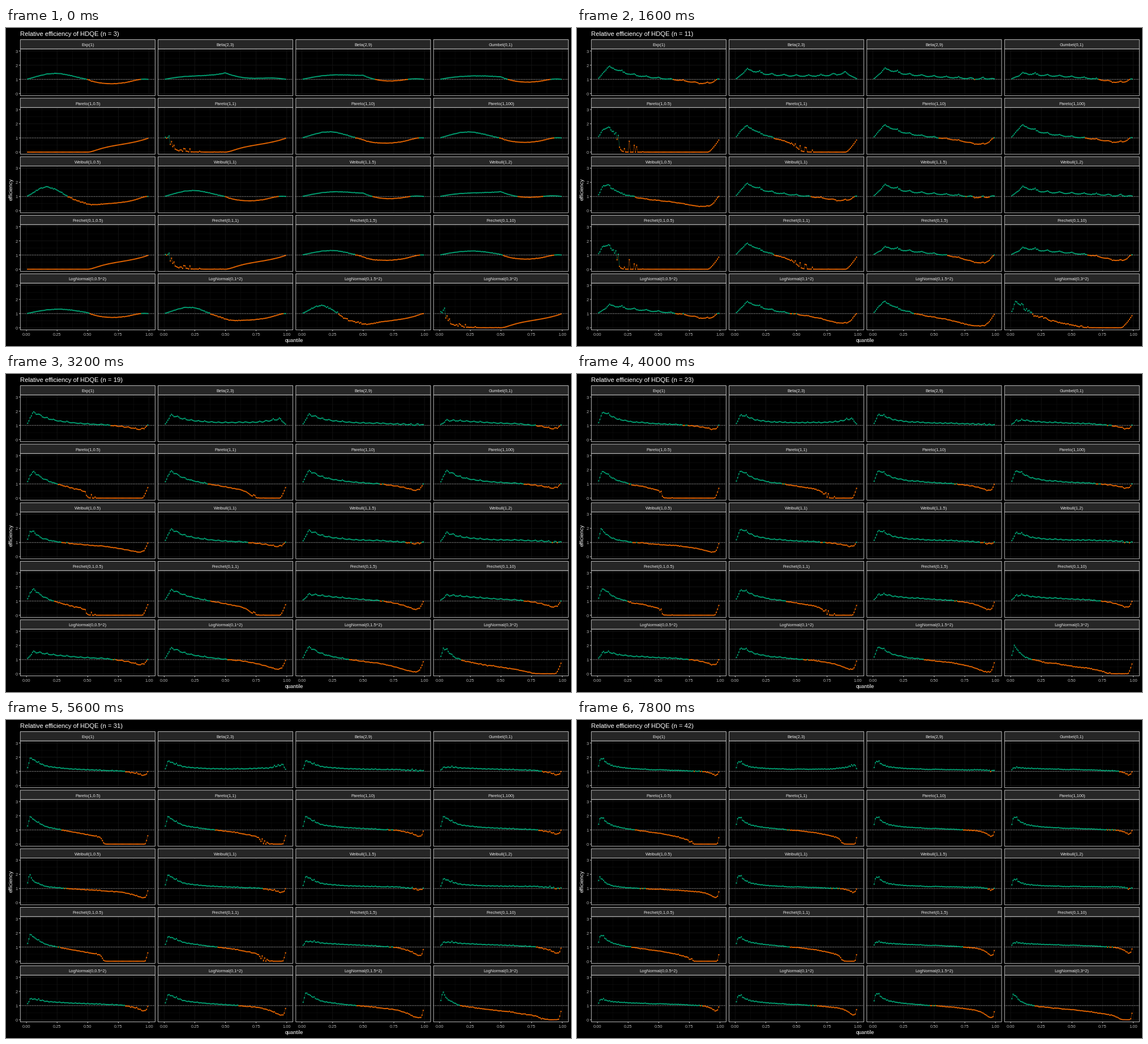
These frames come from a looping animation (998 by 561 pixels, 8000 ms). A matplotlib script:

```python
import math

import matplotlib.pyplot as plt
import numpy as np
from matplotlib.animation import FuncAnimation
from matplotlib.collections import LineCollection
from matplotlib.patches import Rectangle

W, H, DPI = 998, 561, 64
PT = 72 / DPI  # points per pixel
NAMES = [
    "Exp(1)", "Beta(2,3)", "Beta(2,9)", "Gumbel(0,1)",
    "Pareto(1,0.5)", "Pareto(1,1)", "Pareto(1,10)", "Pareto(1,100)",
    "Weibull(1,0.5)", "Weibull(1,1)", "Weibull(1,1.5)", "Weibull(1,2)",
    "Frechet(0,1,0.5)", "Frechet(0,1,1)", "Frechet(0,1,5)", "Frechet(0,1,10)",
    "LogNormal(0,0.5^2)", "LogNormal(0,1^2)", "LogNormal(0,1.5^2)", "LogNormal(0,3^2)",
]
SIZES = range(3, 43)
P = np.arange(1, 100) / 100
BLOCKS, BLOCK, USED = 24, 400, 13  # sample pool, and blocks drawn from it per quantile

GREEN, ORANGE = "#00A878", "#F06A00"
GRID, EDGE, STRIP = "#141414", "#CCCCCC", "#262626"

lgamma = np.vectorize(math.lgamma)
erfc = np.vectorize(math.erfc)


def betainc(a, b, x):
    """Regularised incomplete beta function by continued fraction."""
    a, b, x = np.broadcast_arrays(a, b, x)
    flip = x > (a + 1) / (a + b + 2)
    a, b, x = np.where(flip, b, a), np.where(flip, a, b), np.where(flip, 1 - x, x)
    c, d = np.ones_like(x), 1 / (1 - (a + b) * x / (a + 1))
    h = d
    for m in range(1, 50):
        e = a + 2 * m
        for k in (m * (b - m) * x / ((e - 1) * e),
                  -(a + m) * (a + b + m) * x / (e * (e + 1))):
            d = 1 / (1 + k * d)
            c = 1 + k / c
            h = h * c * d
    log_beta = lgamma(a) + lgamma(b) - lgamma(a + b)
    y = h * np.exp(a * np.log(x) + b * np.log1p(-x) - log_beta) / a
    return np.where(flip, 1 - y, y)


def tail_score(u, v):
    """log(-log(1-u)) - log(-log(u)) for lower and upper tail areas u, v."""
    lo = np.where(u < 0.5, -np.log1p(-np.minimum(u, 0.5)), -np.log(v))
    hi = np.where(v < 0.5, -np.log1p(-np.minimum(v, 0.5)), -np.log(u))
    return np.log(lo) - np.log(hi)


def beta_table(a, b):
    s = np.linspace(-12, 12, 2500)
    x, y = 1 / (1 + np.exp(-s)), 1 / (1 + np.exp(s))
    return tail_score(betainc(a, b, x), betainc(b, a, y)), x


def normal_table():
    z = np.linspace(-6, 6, 2500)
    return tail_score(erfc(-z / 2**0.5) / 2, erfc(z / 2**0.5) / 2), z


BETA3, BETA9, NORMAL = beta_table(2.0, 3.0), beta_table(2.0, 9.0), normal_table()


def transform(e):
    """Map standard exponentials to every distribution, in panel order."""
    log_g = np.log(-np.log(-np.expm1(-e)))
    score = np.log(e) - log_g
    par, fre = np.exp(e), np.exp(-log_g)
    root = np.exp(np.interp(score, *NORMAL) / 2)
    cube = root * root * root
    return [
        e, np.interp(score, *BETA3), np.interp(score, *BETA9), -log_g,
        par * par, par, np.exp(e / 10), np.exp(e / 100),
        e * e, e, np.cbrt(e * e), np.sqrt(e),
        fre * fre, fre, np.exp(-log_g / 5), np.exp(-log_g / 10),
        root, root * root, cube, cube * cube,
    ]


def linear_weights(n):
    return np.maximum(0, 1 - np.abs((n - 1) * P[:, None] - np.arange(n)))


def hd_weights(n):
    p = P[:, None]
    cdf = betainc((n + 1) * p, (n + 1) * (1 - p), np.arange(1, n) / n)
    edge = np.zeros_like(p)
    return np.diff(np.hstack([edge, cdf, edge + 1]), axis=1)


def efficiency(n, truth):
    rng = np.random.default_rng(1000 + n)
    gaps = rng.exponential(size=(BLOCKS * BLOCK, n)) / np.arange(n, 0, -1)
    draws = transform(np.cumsum(gaps, axis=1))
    used = rng.random((BLOCKS, P.size)).argsort(axis=0) < USED
    weights = linear_weights(n), hd_weights(n)
    rows = []
    for x, q in zip(draws, truth):
        x = x.reshape(BLOCKS, BLOCK, n)
        second = x.transpose(0, 2, 1) @ x / BLOCK
        mean = x.mean(axis=1)
        base, hd = [
            (((w @ second * w).sum(-1) - 2 * q * (mean @ w.T) + q * q) * used).sum(0)
            for w in weights
        ]
        rows.append(base / hd)
    return np.array(rows)


TRUTH = transform(-np.log1p(-P))
CURVES = [efficiency(n, TRUTH) for n in SIZES]

# Layout in pixels
LEFT, TOP, PANEL_W, PANEL_H, STRIP_H = 25.3, 36.9, 238.1, 82.5, 16.4
PITCH_X, PITCH_Y = 243.3, 103.3
ORIGINS = [(LEFT + PITCH_X * (i % 4), TOP + PITCH_Y * (i // 4)) for i in range(20)]


def px(x0, x):
    return x0 + PANEL_W * (x + 0.05) / 1.1


def py(y0, y):
    return y0 + PANEL_H * (3.15 - y) / 3.3


plt.rcParams["font.family"] = "Liberation Sans"
fig = plt.figure(figsize=(W / DPI, H / DPI), dpi=DPI, facecolor="black")
ax = fig.add_axes([0, 0, 1, 1])
ax.set_xlim(0, W)
ax.set_ylim(H, 0)
ax.axis("off")


def line(xs, ys, color, width, **kw):
    ax.plot(xs, ys, color=color, lw=width * PT, solid_capstyle="butt", snap=False, **kw)


def label(x, y, text, size, color, **kw):
    return ax.text(x, y, text, fontsize=size * PT, color=color, **kw)


def box(x, y, w, h, z, fill="none"):
    ax.add_patch(Rectangle((x, y), w, h, fc=fill, ec=EDGE, lw=0.9 * PT, zorder=z, snap=False))


for name, (x0, y0) in zip(NAMES, ORIGINS):
    x1, y1 = x0 + PANEL_W, y0 + PANEL_H
    for k in range(9):
        x = px(x0, k / 8)
        line([x, x], [y0, y1], GRID, 0.45 if k % 2 else 0.9, zorder=1)
    for k in range(7):
        y = py(y0, k / 2)
        line([x0, x1], [y, y], GRID, 0.45 if k % 2 else 0.9, zorder=1)
    y = py(y0, 1)
    line([x0, x1], [y, y], "white", 0.9, zorder=2, dashes=(1.1, 2.2), dash_capstyle="butt")
    box(x0, y0, PANEL_W, PANEL_H, 6)
    box(x0, y0 - STRIP_H, PANEL_W, STRIP_H, 7, STRIP)
    label(x0 + PANEL_W / 2, y0 - 4.7, name, 7.65, "#E5E5E5", ha="center", zorder=8)
    if x0 == LEFT:
        for k in range(4):
            y = py(y0, k)
            line([x0 - 2.4, x0], [y, y], EDGE, 0.9)
            label(x0 - 4.5, y + 3, str(k), 7.5, "#B3B3B3", ha="right")
    if y0 == ORIGINS[-1][1]:
        for k in range(5):
            x = px(x0, k / 4)
            line([x, x], [y1, y1 + 2.4], EDGE, 0.9)
            label(x, y1 + 10.4, f"{k / 4:.2f}", 7.5, "#B3B3B3", ha="center")

label(509, 554.5, "quantile", 9.3, "white", ha="center")
label(13.8, 284, "efficiency", 9.4, "white", rotation=90, ha="right", va="center")
title = label(LEFT - 0.3, 13.6, "", 11.3, "white")

lines = LineCollection([], linewidths=0.5 * PT, alpha=0.8, zorder=3, snap=False)
ax.add_collection(lines)
dots = ax.scatter([], [], s=(2.3 * PT) ** 2, linewidths=0, zorder=4)


def draw(i):
    eff = CURVES[i]
    pts = np.array([
        np.column_stack([px(x0, P), py(y0, row)]) for row, (x0, y0) in zip(eff, ORIGINS)
    ])
    tint = np.where(eff >= 1, GREEN, ORANGE)
    lines.set_segments(np.stack([pts[:, :-1], pts[:, 1:]], axis=2).reshape(-1, 2, 2))
    lines.set_color(list(tint[:, :-1].ravel()))
    dots.set_offsets(pts.reshape(-1, 2))
    dots.set_facecolor(list(tint.ravel()))
    title.set_text(f"Relative efficiency of HDQE (n = {SIZES[i]})")
    return lines, dots, title


anim = FuncAnimation(fig, draw, frames=len(SIZES), interval=200, repeat=True,
                     repeat_delay=0, blit=False)
plt.show()
```
